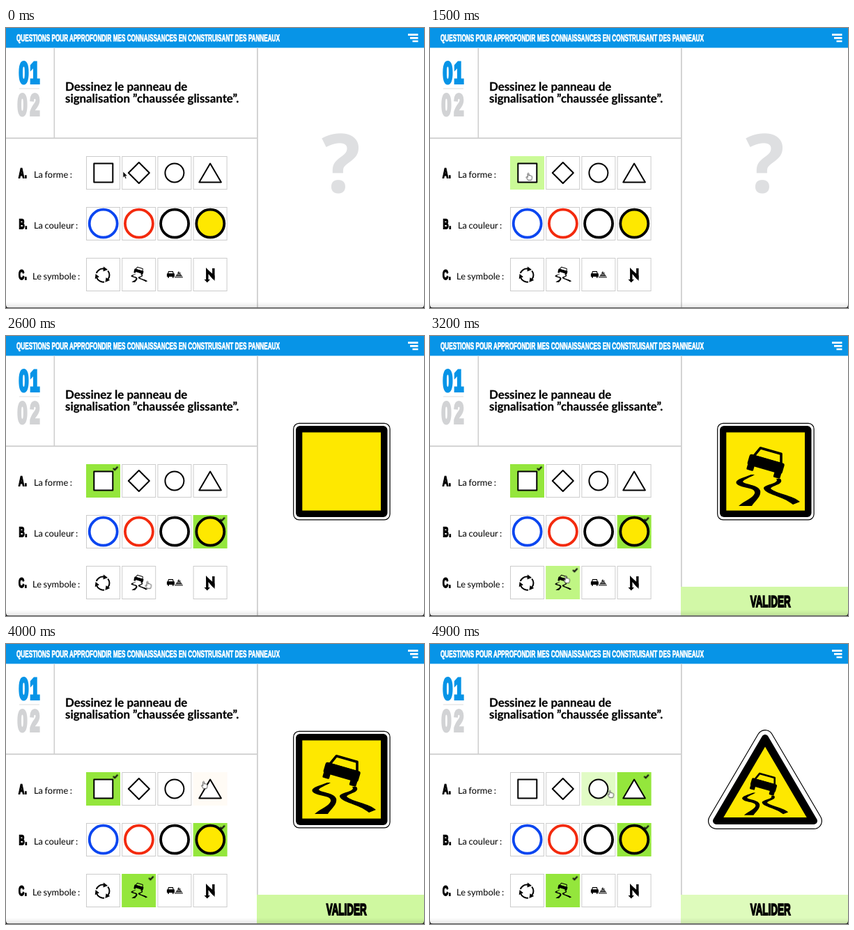
An HTML page that plays this animation: 600x402 px, repeating every 5 s.

```html
<!DOCTYPE html>
<html lang="fr">
<head>
<meta charset="utf-8">
<title>Panneaux</title>
<style>
html, body { margin: 0; width: 100%; height: 100%; overflow: hidden; background: #fff; }
svg { display: block; width: 100%; height: 100%; text-rendering: geometricPrecision; font-variant-ligatures: none; }

/* type */
.cond text { font: bold 14px "Liberation Sans", Arial, sans-serif; transform: scale(.584, 1); stroke: currentColor; stroke-width: .8; fill: currentColor; }
.cond .num { font-size: 43px; stroke-width: 4; }
.cond .letter { font-size: 19.5px; stroke-width: 1.8; }
.cond .big { font-size: 23px; stroke-width: 1.8; }
.ask { font: bold 16.85px Lato, "Open Sans", sans-serif; stroke: #000; stroke-width: .25; }
.label { font: 12.9px Lato, "Open Sans", sans-serif; word-spacing: -.8px; }
.mark { font: bold 117px "Open Sans", "Noto Sans", sans-serif; fill: #dedfe1; text-anchor: middle; }

/* drawing */
.cell { width: 48px; height: 47px; fill: #fff; stroke: #ccc; stroke-width: 1; }
.line { fill: none; stroke: #000; stroke-width: 2; stroke-linejoin: round; }
.ring { fill: #fff; stroke-width: 3.8; }
.tick { fill: none; stroke: #111; stroke-width: 2.2; }

/* timeline */
.cell, .on, .pulse, #cursor { animation: 5s linear infinite; }
.on { animation-timing-function: step-end; opacity: 0; }

#cursor { animation-name: travel; }
@keyframes travel {
  0%, 20% { transform: translate(168px, 206px); }
  26% { transform: translate(150px, 208px); }
  30%, 33% { transform: translate(141px, 208px); }
  37% { transform: translate(190px, 283px); }
  42% { transform: translate(288px, 290px); }
  44%, 47% { transform: translate(293px, 278px); }
  52% { transform: translate(203px, 352px); }
  56%, 63% { transform: translate(193px, 354px); }
  72% { transform: translate(210px, 267px); }
  80% { transform: translate(283.5px, 197px); }
  84%, 90% { transform: translate(296px, 210px); }
  97%, 100% { transform: translate(258px, 210px); }
}
#arrow { animation-name: arrow; }
@keyframes arrow { 0% { opacity: 1; } 25% { opacity: 0; } 35% { opacity: 1; } 41% { opacity: 0; } }
#hand { animation-name: hand; }
@keyframes hand { 0% { opacity: 0; } 25% { opacity: 1; } 35% { opacity: 0; } 41%, 100% { opacity: 1; } }

#a1 { animation-name: a1; }
@keyframes a1 {
  0%, 26% { fill: #fff; stroke: #ccc; }
  30%, 33% { fill: #cbfa97; stroke: #cbfa97; }
  38%, 90% { fill: #94e63c; stroke: #94e63c; }
  96%, 100% { fill: #fff; stroke: #ccc; }
}
#a3 { animation-name: a3; }
@keyframes a3 {
  0%, 94% { fill: #fff; stroke: #ccc; }
  98%, 100% { fill: #e1fbc5; stroke: #e1fbc5; }
}
#a4 { animation-name: a4; }
@keyframes a4 {
  0%, 78% { fill: #fff; stroke: #ccc; }
  80% { fill: #fffbf6; stroke: #fffbf6; }
  84%, 90% { fill: #c8f891; stroke: #c8f891; }
  95%, 100% { fill: #94e63c; stroke: #94e63c; }
}
#b4 { animation-name: b4; }
@keyframes b4 {
  0%, 42% { fill: #fff; stroke: #ccc; }
  46% { fill: #cbfa97; stroke: #cbfa97; }
  50%, 100% { fill: #94e63c; stroke: #94e63c; }
}
#c2 { animation-name: c2; }
@keyframes c2 {
  0%, 52% { fill: #fff; stroke: #ccc; }
  57%, 63% { fill: #cbfa97; stroke: #cbfa97; }
  68%, 100% { fill: #94e63c; stroke: #94e63c; }
}
#c3 { animation-name: c3; }
@keyframes c3 {
  0%, 50%, 56%, 100% { stroke: #ccc; }
  51%, 53% { stroke: #fff; }
}

.until33 { animation-name: until33; }
@keyframes until33 { 0% { opacity: 1; } 33% { opacity: 0; } }
.from33to87 { animation-name: from33to87; }
@keyframes from33to87 { 0% { opacity: 0; } 33% { opacity: 1; } 87% { opacity: 0; } }
.from45to87 { animation-name: from45to87; }
@keyframes from45to87 { 0% { opacity: 0; } 45% { opacity: 1; } 87% { opacity: 0; } }
.from63to87 { animation-name: from63to87; }
@keyframes from63to87 { 0% { opacity: 0; } 63% { opacity: 1; } 87% { opacity: 0; } }
.from45 { animation-name: from45; }
@keyframes from45 { 0% { opacity: 0; } 45%, 100% { opacity: 1; } }
.from63 { animation-name: from63; }
@keyframes from63 { 0% { opacity: 0; } 63%, 100% { opacity: 1; } }
.from87 { animation-name: from87; }
@keyframes from87 { 0% { opacity: 0; } 87%, 100% { opacity: 1; } }

.pulse { animation-name: pulse; }
@keyframes pulse {
  0%, 63% { fill: #dcfbb9; }
  70% { fill: #94e63c; }
  72% { fill: #a2ea52; }
  80% { fill: #cff8a0; }
  81% { fill: #cff8a0; }
  89%, 91% { fill: #98e742; }
  98%, 100% { fill: #defbbc; }
}
</style>
</head>
<body>
<svg viewBox="0 0 600 402">
  <defs>
    <linearGradient id="shade" x2="0" y2="1">
      <stop offset="0" stop-color="#000" stop-opacity="0"/>
      <stop offset="1" stop-color="#000" stop-opacity=".1"/>
    </linearGradient>
    <path id="tick" class="tick" d="M-3.2 0L-.8 2.3L3.4-2.3"/>
    <path id="tri" d="M481 135L411 254H551Z" stroke-linejoin="round"/>
    <g id="skid">
      <g transform="translate(-2 -23) rotate(16)">
        <path d="M-14-17H17L21-3H-20Z" fill="none" stroke="#000" stroke-width="3.6" stroke-linejoin="round"/>
        <rect x="-26" y="-5" width="52" height="16" rx="3"/>
        <rect x="-25" y="9" width="10" height="9" rx="1.5"/>
        <rect x="15" y="9" width="10" height="9" rx="1.5"/>
      </g>
      <path d="M-24-5C-37 0-50 3-44 9C-37 15-17 13-19 22C-22 29-33 32-42 40H-23C-20 34-9 27-11 18C-14 9-35 9-36 5C-33 1-25-1-19-5Z"/>
      <path d="M12 1C18 8-7 9-6 15C-3 24 20 25 36 38L46 34C37 25 11 22 4 15C7 10 24 9 18 1Z"/>
    </g>
    <g id="turn">
      <path d="M-9.2-3A9.6 9.6 0 0 1 1-9.3" fill="none" stroke="#000" stroke-width="2"/>
      <path d="M1-12.4L7-8L.5-5.6Z"/>
    </g>
  </defs>

  <rect width="600" height="402" fill="#fff"/>

  <!-- header -->
  <rect width="600" height="28.4" fill="#0794e7"/>
  <g class="cond" color="#fff" transform="translate(15 19.3)"><text>QUESTIONS POUR APPROFONDIR MES CONNAISSANCES EN CONSTRUISANT DES PANNEAUX</text></g>
  <path d="M577 9.7H591.5M580 14.3H591.5M583.5 19H591.5" stroke="#fff" stroke-width="2.7"/>

  <!-- dividers -->
  <g fill="#cfcfcf">
    <rect x="68.5" y="28.4" width="1.6" height="129.6"/>
    <rect y="157.3" width="360" height="1.8"/>
    <rect x="360" y="28.4" width="1.8" height="374"/>
    <rect x="19" y="86.5" width="29" height="1" fill="#ddd"/>
  </g>
  <g class="cond" color="#0794e7" transform="translate(18.5 79)"><text class="num" letter-spacing="3">01</text></g>
  <g class="cond" color="#d2d3d5" transform="translate(16.5 125)"><text class="num" letter-spacing="7">02</text></g>

  <text class="ask" x="85" y="90">Dessinez le panneau de</text>
  <text class="ask" x="85" y="106.5">signalisation ”chaussée glissante”.</text>

  <g class="cond" color="#000">
    <g transform="translate(18 215)"><text class="letter" letter-spacing="1">A.</text></g>
    <g transform="translate(18.5 288)"><text class="letter" letter-spacing="1">B.</text></g>
    <g transform="translate(18 361)"><text class="letter" letter-spacing="1">C.</text></g>
  </g>
  <text class="label" x="40" y="215">La forme :</text>
  <text class="label" x="40" y="288">La couleur :</text>
  <text class="label" x="38" y="361">Le symbole :</text>

  <!-- shapes -->
  <g transform="translate(115.5 184.5)">
    <rect class="cell" id="a1"/>
    <rect class="cell" x="51.2"/>
    <rect class="cell" id="a3" x="102.4"/>
    <rect class="cell" id="a4" x="153.6"/>
    <g class="line">
      <rect x="10.8" y="10" width="27" height="27" fill="#fff"/>
      <path d="M75.3 8.5L90.3 23.5L75.3 38.5L60.3 23.5Z"/>
      <circle cx="126.4" cy="23.5" r="13.5" fill="#fff"/>
      <path d="M177.6 10L193.4 37H161.8Z" fill="#fff"/>
    </g>
    <g class="on from33to87"><use href="#tick" x="41.5" y="5.5"/></g>
    <g class="on from87"><use href="#tick" x="195" y="5.5"/></g>
  </g>

  <!-- colours -->
  <g transform="translate(115.5 257.5)">
    <rect class="cell"/>
    <rect class="cell" x="51.2"/>
    <rect class="cell" x="102.4"/>
    <rect class="cell" id="b4" x="153.6"/>
    <g class="ring">
      <circle cx="24.2" cy="23.2" r="20" stroke="#0b46f0"/>
      <circle cx="75.4" cy="23.2" r="20" stroke="#f32a0d"/>
      <circle cx="126.6" cy="23.2" r="20" stroke="#000"/>
      <circle cx="177.8" cy="23.2" r="20" stroke="#000" fill="#fee800"/>
    </g>
    <g class="on from45"><use href="#tick" x="195" y="5.5"/></g>
  </g>

  <!-- symbols -->
  <g transform="translate(115.5 330.5)">
    <rect class="cell"/>
    <rect class="cell" id="c2" x="51.2"/>
    <rect class="cell" id="c3" x="102.4"/>
    <rect class="cell" x="153.6"/>
    <g transform="translate(23.5 24.5)">
      <use href="#turn"/>
      <use href="#turn" transform="rotate(120)"/>
      <use href="#turn" transform="rotate(240)"/>
    </g>
    <use href="#skid" transform="translate(75.8 24) scale(.26)"/>
    <g transform="translate(126.4 23.5)">
      <path d="M-8.7-5H-2.2L-1-1.5H0V3H-1.3V4.8H-3V3H-8V4.8H-9.7V3H-11V-1.5H-10Z"/>
      <path d="M-8-3.7H-2.9L-2.3-1.8H-8.7Z" fill="#fff"/>
      <path d="M0 4.5V3.3H12V4.5ZM1 2.6L4-1L6 .6L8.5-1L11.5 2.6ZM4-2L6.2-5L7.2-2.4L9-3L8.6-1.6L6 0Z" fill="#333"/>
    </g>
    <path d="M173.3 31V18L182.3 28V14.5" fill="none" stroke="#000" stroke-width="3.4"/>
    <path d="M171.6 18V14.5L184 25V29.8H181Z"/>
    <path d="M169 30.5H177.5L173.3 35Z"/>
    <g class="on from63"><use href="#tick" x="92.7" y="5.5"/></g>
  </g>

  <!-- sign -->
  <g class="on until33"><text class="mark" x="481" y="236">?</text></g>
  <g class="on from33to87">
    <rect x="412.7" y="125.4" width="138.4" height="138.4" rx="8" fill="#fff" stroke="#000" stroke-width="1.2"/>
  </g>
  <g class="on from45to87">
    <rect x="416" y="129" width="131.5" height="131" rx="6"/>
    <rect x="425.3" y="138.4" width="112.7" height="112.2" fill="#fee800"/>
  </g>
  <g class="on from63to87"><use href="#skid" transform="translate(485 204)"/></g>
  <g class="on from87">
    <use href="#tri" stroke="#000" stroke-width="24"/>
    <use href="#tri" stroke="#fff" stroke-width="21.6"/>
    <use href="#tri" stroke="#000" stroke-width="10"/>
    <path d="M481 147.5L421.3 249H540.7Z" fill="#fee800"/>
    <use href="#skid" transform="translate(481 217) scale(.72)"/>
  </g>

  <g class="on from63">
    <rect class="pulse" x="360" y="360" width="240" height="42"/>
    <g class="cond" color="#000" transform="translate(459.7 389.3)"><text class="big">VALIDER</text></g>
  </g>

  <!-- window edge -->
  <rect y="393" width="600" height="9" fill="url(#shade)"/>
  <rect y="401" width="600" height="1" fill="#666"/>
  <path d="M0 397Q0 402 5 402H0ZM600 397Q600 402 595 402H600Z" fill="#222"/>

  <g id="cursor">
    <path id="arrow" class="on" d="M0 0V9L2 7.2L3.4 10.4L5 9.7L3.6 6.6H6.3Z" stroke="#fff" stroke-width=".6"/>
    <path id="hand" class="on" transform="scale(.87)" d="M-1 1Q0-.6 1 1V4.4Q2 3.4 2.9 4.5Q4 3.8 4.6 5Q6.3 4.8 6.3 6.6V8.6Q6 10 5.2 12H-.6Q-1.8 9.6-3.4 7.6Q-3.4 6-1.8 6.8L-1 7.6Z" fill="#fff" stroke="#222" stroke-width=".9" stroke-linejoin="round"/>
  </g>
</svg>
</body>
</html>
```
